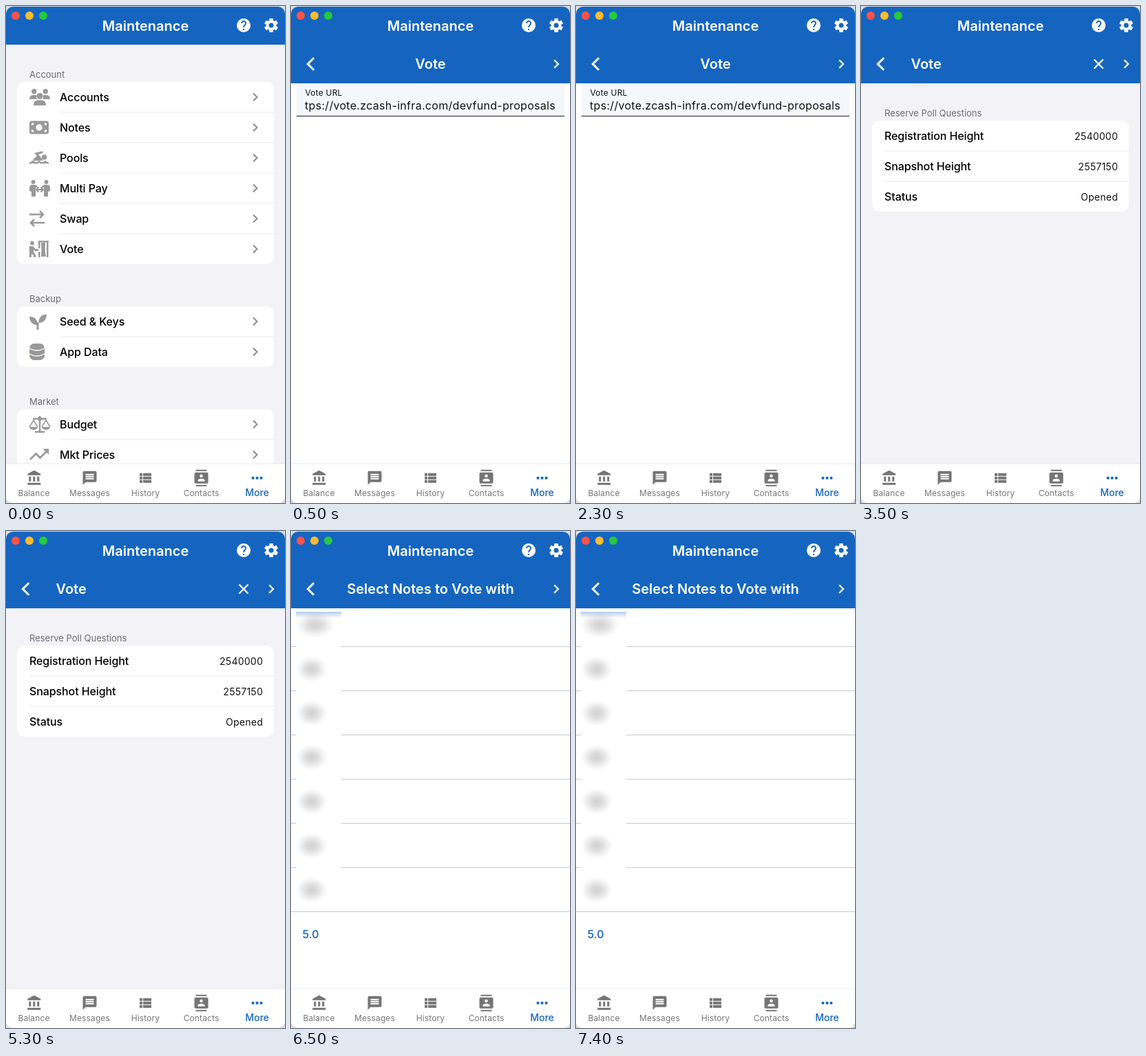
Animation of 405 by 720 pixels, one loop 8000 ms. Source, as an HTML page:

```html
<!DOCTYPE html>
<html lang="en">
<head>
<meta charset="utf-8">
<title>Maintenance</title>
<style>
  html, body { margin: 0; width: 100%; height: 100%; overflow: hidden; background: #ddd; }
  svg { display: block; }
  #stage { width: 405px; height: 720px; font-family: Inter, Roboto, sans-serif; }
</style>
</head>
<body>
<svg id="stage" viewBox="0 0 405 720"></svg>
<script>
const BLUE = '#1565c0', PALE = '#f2f2f7', ICON = '#999', NAV = '#757575';
const LOOP = 8000, CHANGES = [500, 3500, 6500];

const rect = (x, y, w, h, fill, rx = 0) =>
  `<rect x="${x}" y="${y}" width="${w}" height="${h}" rx="${rx}" fill="${fill}"/>`;
const circle = (x, y, r, fill) => `<circle cx="${x}" cy="${y}" r="${r}" fill="${fill}"/>`;
const shape = (d, fill = ICON) => `<path d="${d}" fill="${fill}"/>`;
const line = (d, color = ICON, width = 2.4, cap = 'butt') =>
  `<path d="${d}" fill="none" stroke="${color}" stroke-width="${width}" stroke-linecap="${cap}"/>`;
const at = (x, y, content) => `<g transform="translate(${x} ${y})">${content}</g>`;
const flip = (width, content) => `<g transform="translate(${width}) scale(-1 1)">${content}</g>`;

// y is the middle of the capital letters
const text = (x, y, str, size, fill = '#000', { anchor = 'start', weight = 400, spacing = 0 } = {}) =>
  `<text x="${x}" y="${y + size * 0.364}" font-size="${size}" fill="${fill}" text-anchor="${anchor}"
    font-weight="${weight}" letter-spacing="${spacing}">${str}</text>`;
const title = (x, y, str, anchor = 'middle') => text(x, y, str, 20, '#fff', { anchor, weight: 600 });
const caption = (y, str) => text(34, y, str, 13, '#6d6d72');
const rowLabel = (x, y, str) => text(x, y, str, 16, '#000', { weight: 500, spacing: -0.1 });
const chevron = (x, y, size, color, width) =>
  line(`M${x - size / 2} ${y - Math.abs(size)}l${size} ${Math.abs(size)}l${-size} ${Math.abs(size)}`, color, width);

// Row icons: x runs from 0 to 30, y is centred on 0
const person = circle(5.5, -9, 3, ICON) + shape('M0 4V-1q0-4 4-4h4q3 0 4 4l-3 3V12H3V5z');
const sideUser = circle(6.7, -8.2, 3.7, ICON) + shape('M0 3q0-6 5-6h3.500q1.500 0 2 1q-1 3 .500 5z');
const leaf = 'M0-7q10-1 11.500 10v2Q1 5 0-7z';
const pan = line('M0 4L6-6l6 10', ICON, 1.6) + shape('M0 4h12q-1 4-6 4t-6-4z');
const icons = {
  users: sideUser + flip(30, sideUser) + circle(15, -1.5, 4.5, ICON) +
    shape('M6 12q0-7.500 6-7.500h6q6 0 6 7.500z'),
  bill: rect(0, -9.5, 28, 19, ICON, 3) + circle(14, 0, 4.7, '#fff') +
    shape('M3-6.500h3.500q0 3.500-3.500 3.500zM25-6.500v3.500q-3.500 0-3.500-3.500zM3 6.500v-3.500q3.500 0 3.500 3.500zM25 6.500h-3.500q0-3.500 3.500-3.500z', '#fff'),
  swimmer: circle(21.5, -1, 3.8, ICON) + line('M7 3l6-5.500-3-3.500 8-2', ICON, 3.2, 'round') +
    shape('M8 4l6-8 6 8z') + line('M0 7.500q3.500 0 5-2 4 4 9 0 5 4 9 0 1.500 2 5 2', ICON, 2.6),
  people: person + flip(30, person) + line('M9 2h12', '#fff', 6) +
    line('M10 2h10M13.500-1.500L10 2l3.500 3.500M16.500-1.500L20 2l-3.500 3.500', ICON, 2.2),
  swap: line('M0-6h20M15-11l5 5-5 5M22 6H2M7 1L2 6l5 5', ICON, 2.6),
  booth: circle(4, -8.5, 2.9, ICON) + shape('M0-4h5l4 4h4v3H8L6 1v4l3 3v4H6V9L3 7v5H0z') +
    rect(13, -12, 14.5, 2.5, ICON) + rect(13, -12, 2.5, 11, ICON) + rect(13, 4, 2.5, 8, ICON) +
    shape('M17-9h6q-1 11 1 20h-7q1-10 0-20z') + rect(25, -12, 2.5, 24, ICON),
  seedling: shape(leaf) + at(12, -3, flip(13, shape(leaf))) + rect(10.5, 1, 3, 11, ICON, 1),
  database: rect(0, -12, 22, 24, ICON, 7) + line('M-1-5.500q12 7 24 0M-1 2.500q12 7 24 0', '#fff', 1.4),
  scales: line('M5-8h20M15-12V10.500M8 11h14') + circle(15, -8, 3, ICON) + pan + at(18, 0, pan),
  trend: line('M1 7l8.500-8.500 6 6L26-6', ICON, 2.7) + shape('M19.500-8.500H28V0z'),
};

const card = (y, rows, inset, drawRow) =>
  rect(16, y, 373, rows.length * 44, '#fff', 10) +
  rows.map((row, i) => (i ? rect(inset, y + i * 44 - 0.5, 389 - inset, 1, '#ececef') : '') +
    drawRow(y + i * 44 + 22, ...row)).join('');
const menu = (y, heading, rows) => caption(y - 11, heading) +
  card(y, rows, 78, (cy, label, icon) =>
    at(34, cy, icons[icon]) + rowLabel(78, cy, label) + chevron(361.7, cy, 5.5, '#8e8e93', 2.1));

const subBar = rect(0, 55, 405, 57, BLUE) + chevron(28.8, 84, -8.8, '#fff', 3) + chevron(385, 84, 5.7, '#fff', 2.3);

const menuScreen = rect(0, 56, 405, 610, PALE) +
  menu(110, 'Account', [['Accounts', 'users'], ['Notes', 'bill'], ['Pools', 'swimmer'],
    ['Multi Pay', 'people'], ['Swap', 'swap'], ['Vote', 'booth']]) +
  menu(435, 'Backup', [['Seed &amp; Keys', 'seedling'], ['App Data', 'database']]) +
  menu(584, 'Market', [['Budget', 'scales'], ['Mkt Prices', 'trend']]);

const urlScreen = subBar + title(202.5, 84, 'Vote') +
  rect(8, 112, 389, 48, '#f4f8fc') + rect(8, 159, 389, 1, '#222') +
  text(20.5, 126, 'Vote URL', 12, '#111', { spacing: 0.2 }) +
  `<svg x="20" y="130" width="370" height="28">${text(364, 14.5,
    'https://vote.zcash-infra.com/devfund-proposals', 16, '#111', { anchor: 'end', spacing: 0.3 })}</svg>`;

const pollScreen = rect(0, 112, 405, 554, PALE) + subBar + title(72.5, 84, 'Vote', 'start') +
  line('M338.500 77.500l13 13m0-13l-13 13', '#fff', 2.3) +
  caption(155, 'Reserve Poll Questions') +
  card(166, [['Registration Height', '2540000'], ['Snapshot Height', '2557150'], ['Status', 'Opened']], 34,
    (cy, label, value) => rowLabel(34, cy, label) +
      text(373, cy + 1, value, 14, '#111', { anchor: 'end', spacing: 0.25 }));

// A blurred patch covers the amounts and the dividers behind them
const rowIds = [...Array(7).keys()];
const dividers = rowIds.map(i => rect(0, 167 + i * 64, 405, 1, '#c9c9c9')).join('');
const blurs = rowIds.map(i =>
  `<ellipse cx="${i ? 30 : 35}" cy="${136 + i * 64}" rx="${i ? 23 : 28}" ry="19" fill="url(#blur)"/>`).join('');
const notesScreen = subBar + title(202.5, 84, 'Select Notes to Vote with') + dividers +
  rect(7, 117, 66, 434, '#fff') + rect(7, 117, 66, 9, 'url(#fade)') + blurs +
  text(16.5, 584, '5.0', 16, BLUE, { weight: 500 });

const gear = [0, 60, 120].map(a => `<g transform="rotate(${a})">${rect(-2.8, -10, 5.6, 20, '#fff', 0.8)}</g>`).join('') +
  circle(0, 0, 7.4, '#fff') + circle(0, 0, 3.5, BLUE);
const help = circle(0, 0, 10, '#fff') +
  line('M-3-3a3 3 0 1 1 5.200 2Q0 .500 0 3', BLUE, 2) + rect(-1, 5, 2, 2, BLUE);
const header = rect(0, 0, 405, 56, BLUE) +
  ['#fe5248', '#febc2e', '#28c840'].map((c, i) => circle(14 + 20 * i, 14, 6, c)).join('') +
  title(202.5, 28.5, 'Maintenance') + at(345, 28, help) + at(385, 28, gear);

// Tab icons on a 24 unit grid
const bank = at(0.8, 0, shape('M4 10v7h3v-7zM10 10v7h3v-7zM16 10v7h3v-7zM2 22h19v-3H2zM11.500 1L2 6v2h19V6z', NAV));
const bubble = shape('M4 2h16q2 0 2 2v12q0 2-2 2H6l-4 4V4q0-2 2-2z', NAV) +
  [6, 9, 12].map(y => rect(6, y, 12, 2, '#fff')).join('');
const list = [5, 10, 15].map(y => rect(3.5, y, 4, 4, NAV) + rect(8.5, y, 12, 4, NAV)).join('');
const contact = rect(4, 0, 16, 2, NAV) + rect(4, 22, 16, 2, NAV) + rect(2, 4, 20, 16, NAV, 2) +
  circle(12, 9, 2.25, '#fff') + shape('M7 17v-1.500q0-2.500 5-2.500t5 2.500V17z', '#fff');
const dots = [6, 12, 18].map(x => circle(x, 12, 2.1, BLUE)).join('');
const tabs = [['Balance', bank], ['Messages', bubble], ['History', list], ['Contacts', contact], ['More', dots]];
const tabBar = rect(0, 663, 405, 57, '#fff') + rect(0, 662.5, 405, 1, '#e9e9eb') +
  tabs.map(([label, icon], i) => {
    const x = 40.5 + 81 * i, active = label === 'More';
    return at(x - 12, 671.8, icon) + text(x, active ? 705 : 706, label, active ? 14 : 12,
      active ? BLUE : NAV, { anchor: 'middle', weight: active ? 500 : 400, spacing: active ? 0 : 0.12 });
  }).join('');

document.getElementById('stage').innerHTML = `
  <defs>
    <clipPath id="window"><rect y="1" width="405" height="719" rx="10"/></clipPath>
    <radialGradient id="blur">
      <stop offset="0" stop-opacity=".18"/><stop offset=".35" stop-opacity=".135"/>
      <stop offset=".75" stop-opacity=".045"/><stop offset="1" stop-opacity="0"/>
    </radialGradient>
    <linearGradient id="fade" x2="0" y2="1">
      <stop stop-color="#b4cdea"/><stop offset="1" stop-color="#fff"/>
    </linearGradient>
  </defs>
  <g clip-path="url(#window)">${rect(0, 0, 405, 720, '#fff')}${header}
    ${[menuScreen, urlScreen, pollScreen, notesScreen].map(s => `<g class="screen">${s}</g>`).join('')}
    ${tabBar}
  </g>`;

const screens = document.querySelectorAll('.screen');
const start = performance.now();
function draw() {
  const time = (performance.now() - start) % LOOP;
  const current = CHANGES.filter(change => time >= change).length;
  screens.forEach((screen, i) => screen.style.display = i === current ? '' : 'none');
  requestAnimationFrame(draw);
}
draw();
</script>
</body>
</html>
```
